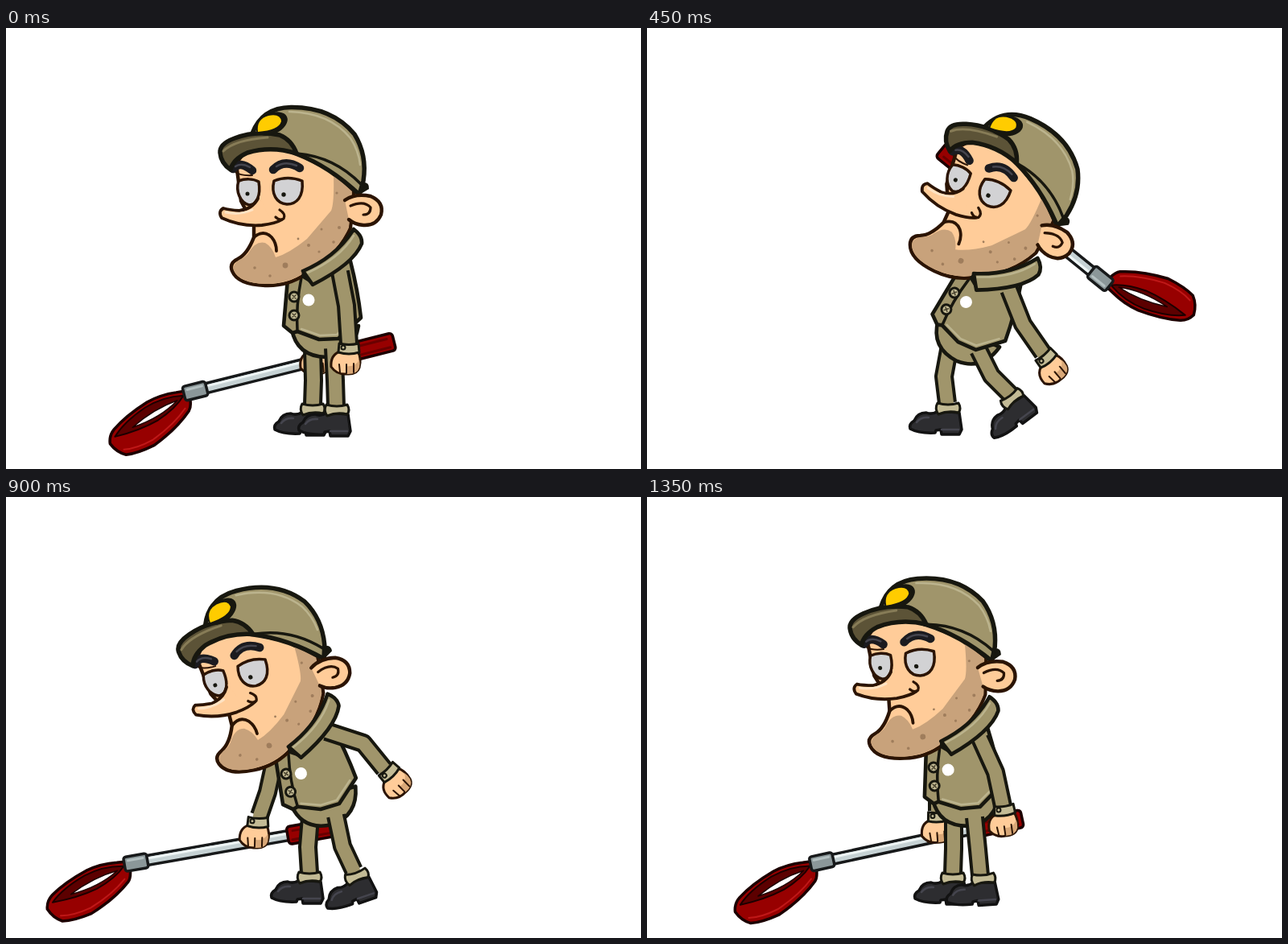
An HTML page that plays this animation: 789 by 548 pixels, repeating every 1500 ms.

```html
<!DOCTYPE html>
<html lang="en">
<head>
<meta charset="utf-8">
<title>Man with a metal hoop tool</title>
<style>
html, body { margin: 0; width: 100%; height: 100%; overflow: hidden; background: #fff; }
svg { display: block; width: 789px; height: 548px; }
path, ellipse, circle, rect { stroke-linejoin: round; stroke-linecap: round; }

/* materials */
.cloth { fill: #a0956b; stroke: #17170f; stroke-width: 4.6; }
.trim { fill: #c3bb95; stroke: #17170f; stroke-width: 3; }
.skin { fill: #ffcc99; stroke: #2b1404; stroke-width: 4.4; }
.red { fill: #970000; stroke: #1c0000; stroke-width: 3.5; }
.black { fill: #17170f; }
.line { fill: none; stroke: #17170f; stroke-width: 3.5; }
.crease { fill: none; stroke: #2b1404; stroke-width: 3.2; }
.shine { fill: none; stroke: #bcb48e; stroke-width: 2.5; }
.eye { fill: #d2d2d4; stroke: #2b1404; stroke-width: 3.5; }
.brow { fill: none; stroke: #1b1b1f; stroke-width: 10.5; }
.gloss { fill: none; stroke: #45454e; stroke-width: 2.5; }
.limb { fill: none; stroke: #a0956b; stroke-width: 16; }
.limb.edge { stroke: #17170f; stroke-width: 24; stroke-linecap: butt; }

/* ten held poses per loop */
.move { animation: 1.5s step-end infinite; }
.head { animation-name: head; transform-origin: 335px 219px; }
.body { animation-name: body; transform-origin: 358px 334px; }
.tool { animation-name: tool; }
.far-arm { animation-name: far-arm; }
.far-hand { animation-name: far-hand; }
.near-arm { animation-name: near-arm; }
.near-hand { animation-name: near-hand; }
.far-leg { animation-name: far-leg; }
.far-shoe { animation-name: far-shoe; }
.near-leg { animation-name: near-leg; }
.near-shoe { animation-name: near-shoe; }

@keyframes head {
  0% { translate: 0 0; rotate: 0deg }
  10% { translate: 25px -6px; rotate: 8deg }
  20% { translate: 50px -5px; rotate: 16deg }
  30% { translate: 75px -4px; rotate: 24deg }
  40% { translate: -54px 32px; rotate: -20deg }
  50% { translate: -47px 25px; rotate: -17deg }
  60% { translate: -38px 19px; rotate: -14deg }
  70% { translate: -29px 13px; rotate: -11deg }
  80% { translate: -19.5px 8.5px; rotate: -7.5deg }
  90% { translate: -9.5px 4px; rotate: -4deg }
}
@keyframes body {
  0% { translate: 0 0; rotate: 0deg }
  10% { translate: 8px -2px; rotate: 7deg }
  20% { translate: 16px -4px; rotate: 16deg }
  30% { translate: 24px -5px; rotate: 26deg }
  40% { translate: -14px 16px; rotate: -19deg }
  50% { translate: -12px 13px; rotate: -17deg }
  60% { translate: -10px 10px; rotate: -14deg }
  70% { translate: -8px 7px; rotate: -10deg }
  80% { translate: -5px 4.5px; rotate: -7deg }
  90% { translate: -2px 2px; rotate: -3deg }
}
@keyframes tool {
  0% { translate: 484px 389px; rotate: 166deg }
  10% { translate: 311px 436px; rotate: 245deg }
  20% { translate: 234px 286px; rotate: 320deg }
  30% { translate: 364px 150px; rotate: 399deg }
  40% { translate: 375px 410px; rotate: 172.7deg }
  50% { translate: 397px 411px; rotate: 170.6deg }
  60% { translate: 414px 409.5px; rotate: 170deg }
  70% { translate: 431px 408px; rotate: 169.3deg }
  80% { translate: 449px 404px; rotate: 168.5deg }
  90% { translate: 468px 399px; rotate: 167.8deg }
}
@keyframes far-arm {
  0% { d: path("M358 325 L372 360 L386 392") }
  10% { d: path("M358 318 L338 336 L296 338") }
  20% { d: path("M366 318 L340 280 L322 238") }
  30% { d: path("M390 320 L410 260 L440 235") }
  40% { d: path("M318 340 L298 368 L283 394") }
  50% { d: path("M325 335 L311 365 L298 398") }
  60% { d: path("M332 335 L325 367 L315 396") }
  70% { d: path("M340 335 L339 368 L332 394") }
  80% { d: path("M346 333 L350 367 L346 392") }
  90% { d: path("M358 330 L361 365 L361 390") }
}
@keyframes far-hand {
  0% { translate: 386px 398px; rotate: -5deg }
  10% { translate: 287px 338px; rotate: 65deg }
  20% { translate: 322px 234px; rotate: 140deg }
  30% { translate: 440px 235px; rotate: 180deg }
  40% { translate: 279px 402px; rotate: 8deg }
  50% { translate: 296px 406px; rotate: 4deg }
  60% { translate: 313px 404px; rotate: 2deg }
  70% { translate: 330px 402px; rotate: 0deg }
  80% { translate: 346px 400px; rotate: -2deg }
  90% { translate: 362px 397px; rotate: -4deg }
}
@keyframes near-arm {
  0% { d: path("M415 303 L423 345 L426 392") }
  10% { d: path("M430 305 L441 345 L451 395") }
  20% { d: path("M440 315 L455 358 L473 400") }
  30% { d: path("M450 325 L467 368 L492 404") }
  40% { d: path("M390 288 L434 278 L474 299") }
  50% { d: path("M390 289 L442 291 L474 316") }
  60% { d: path("M398 291 L444 306 L470 338") }
  70% { d: path("M405 292 L443 320 L465 358") }
  80% { d: path("M410 296 L440 332 L455 372") }
  90% { d: path("M414 300 L433 342 L442 384") }
}
@keyframes near-hand {
  0% { translate: 426px 398px; rotate: 0deg }
  10% { translate: 452px 402px; rotate: -8deg }
  20% { translate: 474px 406px; rotate: -24deg }
  30% { translate: 496px 410px; rotate: -40deg }
  40% { translate: 481px 301px; rotate: -66deg }
  50% { translate: 480px 320px; rotate: -54deg }
  60% { translate: 476px 342px; rotate: -44deg }
  70% { translate: 469px 361px; rotate: -34deg }
  80% { translate: 457px 376px; rotate: -20deg }
  90% { translate: 444px 389px; rotate: -8deg }
}
@keyframes far-leg {
  0% { d: path("M381 398 L382 438 L381 468") }
  10% { d: path("M380 398 L378 435 L379 468") }
  20% { d: path("M378 397 L373 434 L376 467") }
  30% { d: path("M376 395 L369 433 L373 466") }
  40% { d: path("M376 398 L371 433 L375 466") }
  50% { d: path("M377 398 L374 434 L376 466") }
  60% { d: path("M378 398 L375 435 L377 467") }
  70% { d: path("M379 398 L376 436 L378 468") }
  80% { d: path("M380 398 L379 437 L379 468") }
  90% { d: path("M381 398 L381 437 L380 468") }
}
@keyframes far-shoe {
  0% { translate: 381px 474px }
  10% { translate: 379px 474px }
  20% { translate: 376px 473px }
  30% { translate: 374px 473px }
  40% { translate: 375px 472px }
  50% { translate: 376px 473px }
  60% { translate: 377px 473px }
  70% { translate: 378px 474px }
  80% { translate: 379px 474px }
  90% { translate: 380px 474px }
}
@keyframes near-leg {
  0% { d: path("M407 398 L409 438 L410 470") }
  10% { d: path("M409 395 L414 436 L424 468") }
  20% { d: path("M411 398 L422 434 L440 462") }
  30% { d: path("M412 400 L428 432 L452 456") }
  40% { d: path("M411 395 L424 429 L447 456") }
  50% { d: path("M411 395 L421 430 L440 460") }
  60% { d: path("M410 396 L418 434 L432 464") }
  70% { d: path("M409 397 L415 437 L425 468") }
  80% { d: path("M408 398 L413 437 L419 469") }
  90% { d: path("M407 398 L411 438 L414 470") }
}
@keyframes near-shoe {
  0% { translate: 411px 475px; rotate: 0deg }
  10% { translate: 426px 475px; rotate: -10deg }
  20% { translate: 440px 468px; rotate: -24deg }
  30% { translate: 454px 461px; rotate: -37deg }
  40% { translate: 449px 463px; rotate: -35deg }
  50% { translate: 443px 468px; rotate: -27deg }
  60% { translate: 436px 472px; rotate: -19deg }
  70% { translate: 429px 475px; rotate: -11deg }
  80% { translate: 423px 475px; rotate: -7deg }
  90% { translate: 418px 475px; rotate: -4deg }
}
</style>
</head>
<body>
<svg viewBox="0 0 789 548">
  <defs>
    <g id="shoe">
      <path d="M-12 3Q-20 8-27 5Q-38 5-42 15Q-49 19-47 25Q-36 31-16 30L-15 27L-9 26L-8 32L14 32L17 26L14 5Z" fill="#2d2d30" stroke="#121212" stroke-width="3.5"/>
      <path class="gloss" d="M-39 17Q-34 10-24 11M-8 26L13 26"/>
      <path class="trim" d="M-13-7Q0-3 13-7Q17 0 13 5Q0 2-12 7Q-17 0-13-7Z"/>
    </g>
    <g id="hand">
      <path class="skin" style="stroke-width:3" d="M-11 4Q-23 8-22 23Q-15 33-3 32Q10 33 13 24Q16 12 11 4Z"/>
      <path d="M-3 32Q10 33 13 24Q14 18 13 14Q8 24-4 22Z" fill="#d9a878"/>
      <path class="crease" style="stroke-width:2" d="M-12 20L-11 30M-3 20L-3 31M6 19L6 30"/>
      <path class="trim" d="M-12-6Q0-3 12-6L13 5Q0 9-13 5Z"/>
      <circle class="trim" cx="-7" cy="-1" r="2.5" style="stroke-width:2"/>
    </g>
    <g id="button">
      <circle class="trim" r="6"/>
      <path d="M-2-2L2 2M2-2L-2 2" stroke="#4b4530" stroke-width="1.6"/>
    </g>
  </defs>

  <!-- local x axis runs from the grip to the hoop -->
  <g class="move tool">
    <rect x="50" y="-6" width="200" height="12" fill="#c6d2d4" stroke="#17191a" stroke-width="3.5"/>
    <path d="M66 2.5H240" fill="none" stroke="#eef5f5" stroke-width="3"/>
    <rect class="red" x="2" y="-11" width="63" height="22" rx="4"/>
    <path d="M8-6H60M10 5H58" fill="none" stroke="#6a0000" stroke-width="3"/>
    <path class="red" d="M267 3L265-8Q266-18 270-22Q290-40 322-53Q345-58 359-56Q370-50 375-38Q374-28 366-22Q348-9 318 1Q300 6 280 4Z"/>
    <path d="M274-18Q292-34 322-46Q345-52 360-49" fill="none" stroke="#c01818" stroke-width="2"/>
    <path d="M272-2Q297 3 322-5Q352-16 367-31Q335-31 310-24Q285-15 272-2Z" fill="#5c0000" stroke="#1c0000" stroke-width="2"/>
    <path d="M281-6Q312-9 343-25Q306-22 281-6Z" fill="#fff" stroke="#1c0000" stroke-width="1.5"/>
    <rect x="242" y="-9" width="29" height="18" rx="3" fill="#8b9799" stroke="#17191a" stroke-width="3.5"/>
    <path d="M247 4H266" fill="none" stroke="#b4c0c1" stroke-width="3"/>
  </g>

  <path class="move far-arm limb edge"/>
  <path class="move far-arm limb"/>
  <use class="move far-hand" href="#hand"/>

  <path class="move far-leg limb edge"/>
  <path class="move far-leg limb"/>
  <use class="move far-shoe" href="#shoe"/>

  <path class="move body cloth" d="M355 374Q361 408 398 409Q432 406 438 370Z"/>

  <path class="move near-leg limb edge"/>
  <path class="move near-leg limb"/>
  <use class="move near-shoe" href="#shoe"/>

  <g class="move body">
    <path class="cloth" d="M350 312L345 370L356 379L362 377L389 387L413 386L441 360Q437 325 428 290L400 276Z"/>
    <path class="shine" d="M367 374L390 382L411 381L433 361"/>
    <path class="line" d="M367 310Q360 345 362 376"/>
    <use href="#button" x="358" y="334"/>
    <use href="#button" x="358" y="357"/>
    <circle cx="376" cy="338" r="7.5" fill="#fff"/>
  </g>

  <path class="move near-arm limb edge"/>
  <path class="move near-arm limb"/>
  <use class="move near-hand" href="#hand"/>

  <g class="move head">
    <path class="skin" d="M286 168L292 215L308 245L308 260Q300 281 288 287Q277 292 281 302Q288 319 322 320Q350 321 372 306Q412 284 428 248L432 205L400 175L350 150L300 150Z"/>
    <path d="M301 280Q310 264 322 267Q331 272 335 285Q352 280 374 262L404 227Q408 218 407 182L430 203L426 248Q410 283 371 304Q350 318 322 318Q290 317 283 301Q281 294 290 288Q297 285 301 280Z" fill="#c8a27b"/>
    <g fill="#9f7d5c">
      <circle cx="309" cy="298" r="1.8"/><circle cx="347" cy="295" r="3.4"/>
      <circle cx="328" cy="308" r="1.8"/><circle cx="376" cy="270" r="2"/>
      <circle cx="389" cy="278" r="1.6"/><circle cx="363" cy="262" r="1.4"/>
      <circle cx="407" cy="266" r="1.8"/><circle cx="414" cy="248" r="2"/>
      <circle cx="392" cy="250" r="1.5"/><circle cx="411" cy="205" r="1.6"/>
    </g>
    <path class="crease" style="stroke-width:3.8" d="M308 260Q320 250 330 260Q336 267 336 277"/>

    <path class="eye" d="M289 190C297 187 307 187 314 191C317 209 311 220 302 220C291 217 285 203 289 190Z"/>
    <path class="eye" d="M333 190C345 185 358 186 368 190C370 210 361 219 349 219C336 218 329 206 333 190Z"/>
    <circle class="black" cx="300" cy="206" r="2.5"/>
    <circle class="black" cx="345" cy="207" r="2.7"/>

    <path class="skin" style="stroke-width:3.8" d="M313 212Q306 225 290 227Q277 226 270 224Q263 228 268 236Q292 247 318 245Q335 243 343 238"/>
    <path d="M315 209L324 206L341 233L328 237Z" fill="#ffcc99"/>
    <path d="M273 229Q290 233 306 226" fill="none" stroke="#ffe3c4" stroke-width="3"/>
    <path class="crease" d="M340 226Q348 231 345 237Q340 240 335 235"/>

    <path class="crease" style="stroke-width:2" d="M285 179Q292 184 306 183"/>
    <path class="brow" d="M282 175Q290 164 306 177"/>
    <path class="gloss" d="M285 172Q292 167 303 173"/>
    <path class="brow" d="M332 176Q346 162 365 174"/>
    <path class="gloss" d="M336 172Q347 165 361 171"/>

    <path class="black" d="M440 192Q452 190 451 200L441 206Z"/>
    <path class="cloth" style="stroke-width:5.5" d="M306 131Q318 99 354 98.5Q405 98 433 132Q449 158 444 190L439 207Q402 172 360 156Z"/>
    <path class="shine" d="M352 104Q402 105 428 137Q438 152 440 170"/>
    <path class="line" d="M362 156Q408 160 441 194"/>
    <path d="M266 155Q265 144 284 137Q310 127 340 133Q355 139 361 156Q330 146 300 155Q282 163 279 176Q267 168 266 155Z" fill="#5c5337" stroke="#17170f" stroke-width="5.5"/>
    <path d="M270 153Q284 139 325 136" fill="none" stroke="#877c57" stroke-width="3"/>
    <ellipse class="black" cx="330" cy="119" rx="21" ry="13" transform="rotate(-25 330 119)"/>
    <path d="M313 129Q311 113 326 109Q341 106 342 116Q339 127 313 129Z" fill="#ffcc00"/>

    <path class="skin" d="M421 214Q434 205 453 209Q470 216 466 232Q460 246 444 245Q433 244 426 238"/>
    <path class="crease" d="M428 221Q445 214 453 223Q453 232 444 232"/>
  </g>

  <g class="move body">
    <path class="cloth" d="M369 302Q411 284 432 250Q443 258 442 268Q432 293 381 319Z"/>
    <path class="shine" d="M375 304Q415 286 432 258"/>
    <path class="black" d="M368 301L382 321L375 315L367 310Z"/>
  </g>
</svg>
</body>
</html>
```
